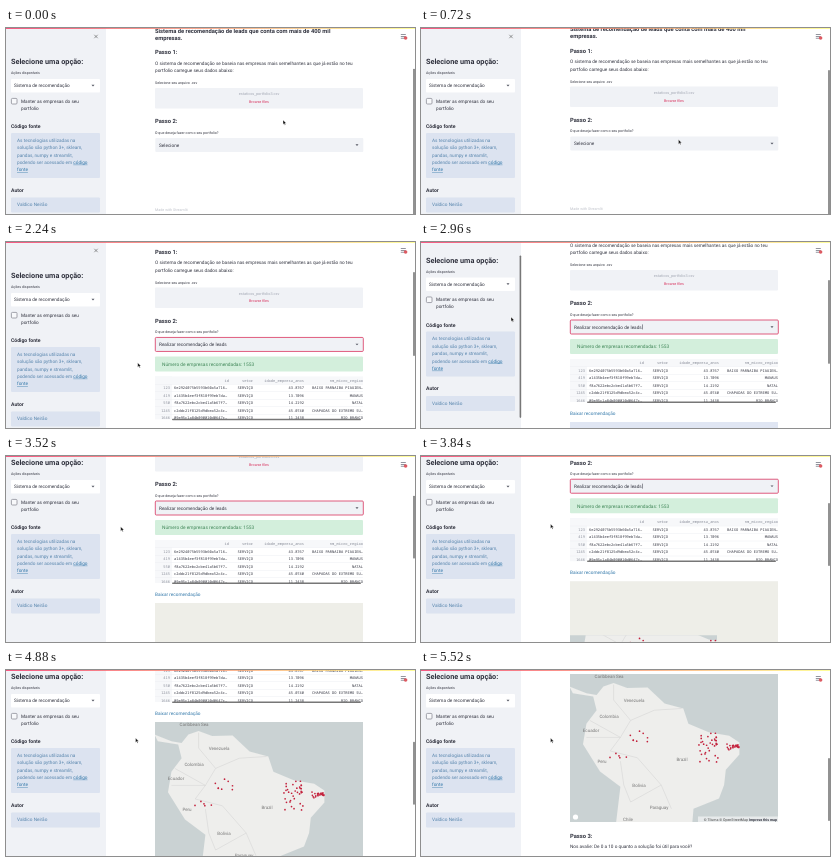
An HTML page with a canvas for the animation above (5.6 s loop, 409x186 px).

```html
<!DOCTYPE html>
<html lang="pt-BR">
<head>
<meta charset="utf-8">
<style>
html, body { margin: 0; width: 100%; height: 100%; overflow: hidden; background: #fff; }
canvas { display: block; width: 409px; height: 186px; }
</style>
</head>
<body>
<canvas id="stage"></canvas>
<script>
const W = 409, H = 186, LOOP = 5600, STEP = 80;
const SANS = 'Roboto, sans-serif', MONO = '"Noto Sans Mono", monospace';
const INK = '#31333f', PALE = '#f0f2f6', GRAY = '#a3a8b4', RED = '#d8345f';
const INFO = '#dce3f0', BLUE = '#5684ac', LINK = '#2f76a8';
const canvas = document.getElementById('stage'), c = canvas.getContext('2d');
const dpr = window.devicePixelRatio || 1;
canvas.width = W * dpr;
canvas.height = H * dpr;
c.textRendering = 'geometricPrecision';

// Key poses: [time, value, ...]
const SCROLL = [[0, 0], [560, 1.5], [2000, 1.5], [2560, 32], [3200, 32], [3520, 65], [4240, 114], [4880, 160], [5520, 208]];
const SIDE = [[2640, 0], [3200, 27]];
const POINTER = [[80, 277, 92], [800, 255, 114], [1040, 255, 114], [1440, 163, 155], [1760, 163, 155],
  [2880, 90, 75], [3120, 90, 75], [3760, 129.5, 68]];
const OPEN = 1040, PICK = 1680, RESULTS = 1960, MAP_BOX = 3200, TILES = 3840, MAP_READY = 4400;

// Longitude and latitude of a few key points
const COAST = [[-85, 11], [-80, 9], [-77, 8.5], [-75, 11], [-72, 12], [-68, 10.5], [-62, 10.7], [-57, 6], [-51.5, 4.5],
  [-50, 0], [-44, -2.5], [-38, -3.5], [-35, -5.5], [-35, -9], [-39, -13.5], [-39.5, -18], [-41, -22], [-48.5, -25],
  [-49, -31], [-71.5, -31], [-70, -18.5], [-76, -14], [-81, -6], [-80, 0], [-77, 4], [-78, 8], [-84, 9]];
const BORDERS = [
  [[-52, 4.5], [-60, 4], [-67, 1], [-70, -4], [-73, -8], [-65, -10], [-58, -18], [-55, -25]],
  [[-72, 11.5], [-72, 7], [-67, 1]],
  [[-79, 1], [-70, -4], [-80, -4]],
  [[-70, -11], [-69, -18], [-67, -23], [-58, -18]]
];
const PLACES = [['Caribbean Sea', 188, 214], ['Venezuela', 213, 238], ['Colombia', 188, 254], ['Ecuador', 170, 268],
  ['Peru', 181, 299], ['Brazil', 261, 297], ['Bolivia', 218, 323], ['Paraguay', 238, 345], ['Chile', 207, 357]];
const ROWS = [
  ['123', '6e2924075b5593b60a5a716…', '43.8767', 'BAIXO PARNAIBA PIAUIEN…'],
  ['419', 'a1435b4eef3f818f99eb7da…', '13.7096', 'MANAUS'],
  ['550', 'f8a7622ebc2cbe41a5b67f7…', '14.2192', 'NATAL'],
  ['1245', 'c2ddc21f8125d9dbea52c4c…', '45.0740', 'CHAPADAS DO EXTREMO SU…'],
  ['1646', '09e95c1a84b090010d0647c…', '11.2438', 'RIO BRANCO']
];

let seed = 11;
const rand = () => (seed = seed * 16807 % 2147483647) / 2147483647;
const cluster = (n, x, y, w, h) => Array.from({ length: n }, () => [x + rand() * w, y + rand() * h]);
const DOTS = [cluster(5, 189, 291, 19, 10), cluster(8, 204, 268, 38, 14), cluster(20, 280, 271, 16, 14),
  cluster(14, 277, 282, 20, 18), cluster(24, 306, 282, 12, 6)].flat();

function pose(keys, t) {
  const i = keys.findIndex(k => k[0] > t);
  if (i === 0) return keys[0].slice(1);
  if (i < 0) return keys[keys.length - 1].slice(1);
  const a = keys[i - 1], b = keys[i], p = (t - a[0]) / (b[0] - a[0]);
  return a.slice(1).map((v, j) => v + (b[j + 1] - v) * p);
}

function text(s, x, y, { size = 4.7, color = INK, weight = 400, align = 'left', font = SANS } = {}) {
  c.font = `${weight} ${size}px ${font}`;
  c.textAlign = align;
  c.fillStyle = color;
  c.fillText(s, x, y + size * 0.34);
}
const bold = (s, x, y, size = 5.8) => text(s, x, y, { size, weight: 700 });
const label = (s, x, y) => text(s, x, y, { size: 3.6 });
const mono = (s, x, y, align = 'right', color = INK) => text(s, x, y, { size: 3.7, font: MONO, align, color });

function box(x, y, w, h, fill, stroke, r = 1) {
  c.beginPath();
  c.roundRect(x, y, w, h, r);
  if (fill) { c.fillStyle = fill; c.fill(); }
  if (stroke) { c.strokeStyle = stroke; c.lineWidth = 0.8; c.stroke(); }
}

function shape(points, fill, stroke, width = 0.6) {
  c.beginPath();
  points.forEach(p => c.lineTo(...p));
  if (fill) { c.fillStyle = fill; c.fill(); }
  if (stroke) { c.strokeStyle = stroke; c.lineWidth = width; c.stroke(); }
}

function dot(x, y, r, fill) {
  c.beginPath();
  c.arc(x, y, r, 0, 7);
  c.fillStyle = fill;
  c.fill();
}

const caret = (x, y) => shape([[x - 1.5, y - 0.7], [x + 1.5, y - 0.7], [x, y + 0.9]], '#555763');

function thumb(x, scroll, height) {
  box(x, scroll * H / height, 1.6, H * H / height, '#777');
}

function sidebar(t) {
  const [scroll] = pose(SIDE, t);
  c.fillStyle = PALE;
  c.fillRect(0, 0, 100, H);
  c.save();
  c.translate(0, -scroll);
  shape([[88.3, 6.8], [91.7, 10.2]], null, '#555');
  shape([[91.7, 6.8], [88.3, 10.2]], null, '#555');
  bold('Selecione uma opção:', 5, 34, 7.3);
  label('Ações disponíveis', 5, 45);
  box(5, 51, 89, 13.5, '#fff');
  text('Sistema de recomendação', 8, 57.5);
  caret(87, 57.5);
  box(5.4, 70.4, 5.6, 5.6, '#f8f9fb', '#8d8f99');
  text('Manter as empresas do seu', 15, 73);
  text('portfolio', 15, 80.3);
  bold('Código fonte', 5, 98.5, 5.1);
  box(5, 105, 89, 45, INFO);
  ['As tecnologias utilizadas na', 'solução são python 3+, sklearn,', 'pandas, numpy e streamlit,', 'podendo ser acessado em ']
    .forEach((s, i) => text(s, 11, 112.3 + i * 7.4, { color: BLUE }));
  const x = 11 + c.measureText('podendo ser acessado em ').width;
  [['código', x, 134.5], ['fonte', 11, 141.9]].forEach(([s, lx, y]) => {
    text(s, lx, y, { color: LINK });
    c.fillRect(lx, y + 2.2, c.measureText(s).width, 0.4);
  });
  bold('Autor', 5, 162, 5.1);
  box(5, 169.5, 89, 15, INFO);
  text('Valdico Neirão', 11, 176.8, { color: BLUE });
  c.restore();
  if (scroll > 0 && t < 3200) thumb(98.6, scroll, H + 27);
}

function selectBox(t) {
  const picked = t >= PICK, value = picked ? 'Realizar recomendação de leads' : 'Selecione';
  box(149.3, 110, 208, 14, PALE, t >= OPEN ? RED : null);
  text(value, 153, 117);
  if (picked && t % 1280 < 640) c.fillRect(153.6 + c.measureText(value).width, 114.4, 0.5, 5);
  caret(351, 117);
}

function menu() {
  c.save();
  c.shadowColor = 'rgba(0,0,0,.25)';
  c.shadowBlur = 4 * dpr;
  c.shadowOffsetY = dpr;
  box(149, 126, 209, 42, '#fff');
  c.restore();
  c.fillStyle = '#ecedf3';
  c.fillRect(149, 153, 209, 12);
  text('Selecione', 154, 134.5, { weight: 700 });
  text('Análise sobre o seu portfolio', 154, 147, { color: GRAY });
  text('Realizar recomendação de leads', 154, 159);
}

function table() {
  c.fillStyle = '#f7f8fa';
  c.fillRect(149, 149, 208, 7.5);
  c.fillRect(149, 149, 17, 43);
  [['id', 223], ['setor', 247], ['idade_empresa_anos', 298], ['nm_micro_regiao', 357]]
    .forEach(([s, x]) => mono(s, x, 153, 'right', '#888c98'));
  ROWS.forEach(([index, id, age, region], i) => {
    const y = 160.4 + i * 7.5;
    c.fillStyle = '#e8eaef';
    c.fillRect(149, y - 3.8, 208, 0.4);
    mono(index, 164, y, 'right', '#888c98');
    mono(id, 168, y, 'left');
    mono('SERVIÇO', 247, y);
    mono(age, 298, y);
    mono(region, 357, y);
  });
  box(166, 191.4, 189, 1.5, '#777');
}

function map(t) {
  const project = ([lon, lat]) => [213 + 3.4 * (lon + 66), 238 + 3.4 * (7 - lat)];
  const ready = t >= MAP_READY;
  c.fillStyle = t < MAP_BOX ? '#e0e6f3' : '#eeeee8';
  c.fillRect(149, 212, 208, 148);
  if (t < TILES) return;
  c.save();
  c.beginPath();
  if (ready) c.rect(149, 212, 208, 148);
  else c.rect(149, 266, 147, 94);
  c.clip();
  c.fillStyle = '#cad2d3';
  c.fillRect(149, 212, 208, 148);
  shape(COAST.map(project), '#eeeeec');
  BORDERS.forEach(line => shape(line.map(project), null, '#d0d1d0', 0.5));
  if (ready) PLACES.forEach(([s, x, y]) => text(s, x, y, { size: 4.5, color: '#777', align: 'center' }));
  c.restore();
  DOTS.forEach(([x, y]) => dot(x, y, 0.85, '#c3213c'));
  dot(154.5, 355, 2.6, '#fff');
  c.fillStyle = 'rgba(255,255,255,.55)';
  c.fillRect(277, 354.5, 80, 5.5);
  text('Improve this map', 356, 357.3, { size: 3.6, weight: 700, align: 'right' });
  const x = 355 - c.measureText('Improve this map').width;
  text('© Tiluma © OpenStreetMap', x, 357.3, { size: 3.6, color: '#444', align: 'right' });
}

function page(t, scroll) {
  c.save();
  c.translate(0, -scroll);
  bold('Sistema de recomendação de leads que conta com mais de 400 mil', 149, 3);
  bold('empresas.', 149, 9.6);
  bold('Passo 1:', 149, 24.3);
  text('O sistema de recomendação se baseia nas empresas mais semelhantes as que já estão no teu', 149, 35);
  text('portfolio carregue seus dados abaixo:', 149, 42.5);
  label('Selecione seu arquivo .csv', 149, 55);
  box(149, 60, 208, 20.5, PALE);
  text('estaticos_portfolio3.csv', 253, 66, { size: 3.8, color: GRAY, align: 'center' });
  text('Browse files', 253, 73.8, { size: 3.7, color: RED, align: 'center' });
  bold('Passo 2:', 149, 93.5);
  label('O que deseja fazer com o seu portfolio?', 149, 104.3);
  selectBox(t);
  if (t < RESULTS) {
    text('Made with Streamlit', 149, 182, { size: 3.7, color: '#bfc2ca' });
    if (t >= OPEN && t < PICK) menu();
  } else {
    box(149, 129, 208, 15, '#d3efdc');
    text('Número de empresas recomendadas: 1553', 156, 136.7, { size: 4.8, color: '#3f8657' });
    table();
    text('Baixar recomendação', 149, 203, { color: LINK });
    map(t);
    bold('Passo 3:', 149, 374);
    text('Nos avalie: De 0 a 10 o quanto a solução foi útil para você?', 149, 384.3);
  }
  c.restore();
}

function chrome(t, scroll) {
  thumb(407.2, scroll + 52, t < RESULTS ? 237 : t < MAP_BOX ? 412 : 549);
  c.fillStyle = '#777a85';
  [6.2, 8, 9.8].forEach(y => c.fillRect(394.8, y, 5, 0.8));
  dot(399.6, 10, 1.8, '#dd5a62');
  const band = c.createLinearGradient(0, 0, W, 0);
  band.addColorStop(0, '#f63366');
  band.addColorStop(1, '#fffd80');
  c.fillStyle = band;
  c.fillRect(0, 0, W, 0.8);
}

function pointer(t) {
  c.save();
  c.translate(...pose(POINTER, t));
  if (t >= OPEN && t < 1840) {
    shape([[0, 0], [1, 0], [1.2, 2], [4, 2.8], [3.8, 5], [1, 5.2], [-1.5, 3], [0, 3], [0, 0]], '#fff', '#222');
  } else {
    shape([[0, 0], [0, 4.6], [1.1, 3.6], [1.9, 5.2], [2.6, 4.8], [1.9, 3.3], [3.3, 3.2], [0, 0]], '#111', '#fff', 0.4);
  }
  c.restore();
}

function draw(now) {
  const t = Math.floor(now % LOOP / STEP) * STEP, [scroll] = pose(SCROLL, t);
  c.setTransform(dpr, 0, 0, dpr, 0, 0);
  c.fillStyle = '#fff';
  c.fillRect(0, 0, W, H);
  page(t, scroll);
  sidebar(t);
  chrome(t, scroll);
  pointer(t);
}

const start = performance.now();
function tick() {
  draw(performance.now() - start);
  requestAnimationFrame(tick);
}
tick();
</script>
</body>
</html>
```
